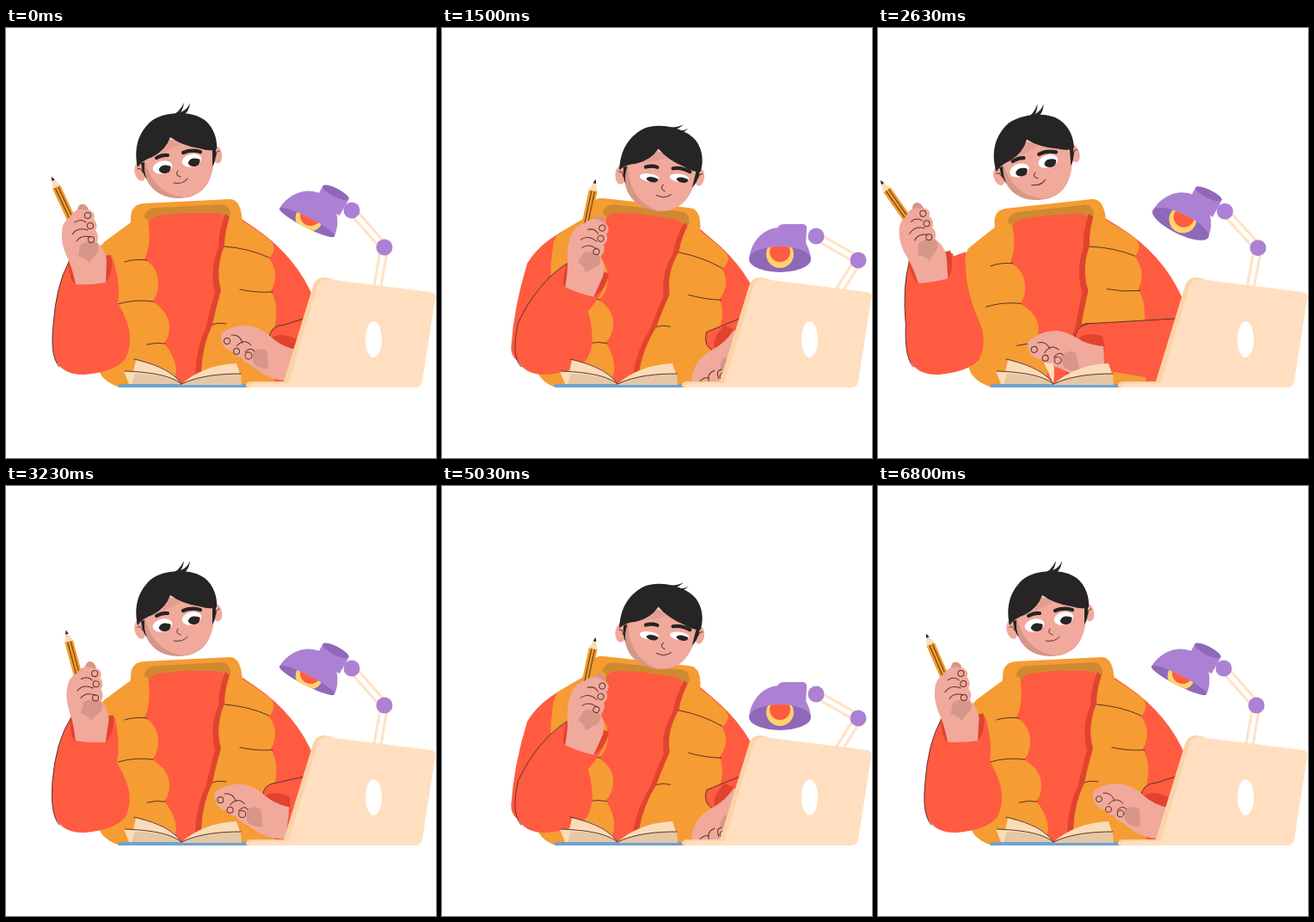
Recreate the animation shown at these times as an HTML page. Size 500x500 px, loop 6.83 s.

```html
<!DOCTYPE html>
<html lang="en">
<head>
<meta charset="utf-8">
<title>Studying at the desk</title>
<style>
html, body { margin: 0; width: 100%; height: 100%; overflow: hidden; background: #fff; }
svg { display: block; width: 100vw; height: 100vh; }
.red { fill: #ff5b41; }
.deep { fill: #e2432f; }
.vest { fill: #f59c33; }
.skin { fill: #f0a99b; }
.shade { fill: #d69688; }
.dark { fill: #262424; }
.purple { fill: #ac80d3; }
.plum { fill: #9068b8; }
.cream { fill: #ffdfc0; }
.line { fill: none; stroke: #5c3428; stroke-width: 1; stroke-linecap: round; stroke-linejoin: round; }
.rod { fill: none; stroke: #ffe2c4; stroke-width: 11; }
.gap { fill: none; stroke: #fff; stroke-width: 5; }
</style>
</head>
<body>
<svg viewBox="0 0 500 500">
  <clipPath id="desk"><rect width="500" height="418"/></clipPath>
  <clipPath id="opening"><ellipse id="mask" rx="36"/></clipPath>
  <g clip-path="url(#desk)">
    <g id="lamp">
      <path id="rod" class="rod"/><path id="gap" class="gap"/>
      <circle id="knob1" class="purple" r="9.5"/><circle id="knob2" class="purple" r="9.5"/>
      <g id="shade">
        <g id="neck">
          <path class="purple" d="M-3-20V-34Q-3-41 5-41H27Q32-40 31-34L30-16Z"/>
          <ellipse id="cap" class="plum" cx="14" cy="-38" rx="17"/>
        </g>
        <path class="purple" d="M-36 0C-34-22-18-37 0-37S34-22 36 0Z"/>
        <ellipse id="rim" class="plum" rx="36"/>
        <g clip-path="url(#opening)">
          <circle cy="-6" r="16" fill="#ffd36b"/><circle cy="-9" r="12" fill="#ff5b41"/>
        </g>
      </g>
    </g>

    <path data-rule="shoulder" class="red" d="M130 245Q80 262 66 290Q58 335 62 375Q66 400 120 390L140 300Z"/>
    <g id="clothes">
      <path data-rule="bend" class="red" d="M165 217L262 214L290 233Q338 266 358 315L375 418L140 418L116 330Q110 270 165 217Z"/>
      <path data-rule="bend" class="vest" d="M146 232Q141 205 160 204L260 199Q275 199 275 232L210 240Z"/>
      <path data-rule="bend" fill="#d08930" d="M160 226Q160 209 176 209L252 205Q262 206 262 226L210 230Z"/>
      <path data-rule="bend" class="red" d="M163 234Q166 220 178 218L205 215L246 215Q256 217 257 230L250 330L185 330Z"/>
      <use href="#right" class="deep" transform="translate(-7 2)"/>
      <path data-rule="bend" class="vest" d="M150 216L165 223Q170 250 161 269Q177 278 177 298Q177 310 170 318Q190 330 190 348Q190 360 184 366Q198 384 198 400L193 418L132 418Q104 408 106 385Q106 365 120 335Q108 300 109 270Q108 255 114 249Q130 237 148 224Z"/>
      <g class="vest"><path id="right" data-rule="bend" d="M262 214Q254 235 254 253Q243 280 250 305Q243 330 240 345Q228 370 227 400L228 418L312 418L312 350Q318 322 308 306Q319 286 306 268Q317 255 306 246Q292 235 274 224Z"/></g>
      <path data-rule="bend" class="line" d="M138 272Q150 268 164 270M130 321Q150 315 171 318M164 368Q175 365 185 367M254 254Q282 256 306 267M272 304Q290 308 310 307M240 345Q247 342 256 344"/>
    </g>

    <g id="head">
      <ellipse class="skin" cx="156" cy="167" rx="6.5" ry="11" transform="rotate(-12 156 167)"/>
      <ellipse class="skin" cx="245" cy="147" rx="6" ry="10.5" transform="rotate(-12 245 147)"/>
      <path class="line" d="M153 164q4-2 6 4M248 143q-4 0-4 6"/>
      <path class="shade" d="M157 140C157 180 172 198 202 198C232 197 244 175 242 135Z"/>
      <path class="skin" d="M158 130C160 172 178 193 206 197C233 195 245 172 242 130Z"/>
      <path class="dark" d="M157 157L161 156Q160 167 164 176Q158 169 157 157ZM240 140L244 140Q245 154 240 161Z"/>
      <path class="dark" d="M153 162C149 142 152 124 168 109C182 97 215 95 231 107C242 116 246 130 245 141Q238 144 225 140Q205 137 191 127Q186 142 170 150Q158 154 153 162Z"/>
      <path class="shade" d="M191 127Q197 133 203 135Q193 141 179 146Q188 139 191 127Z" opacity=".55"/>
      <path id="tuft" class="dark" d="M192 102Q201 99 207 87Q206 94 203 98Q211 95 214 87Q213 97 206 102Z"/>
      <g id="face">
        <g id="eyes"></g>
        <path fill="none" stroke="#262424" stroke-width="4.2" stroke-linecap="round" d="M175 151Q182 147 188 148M206 145Q215 141 226 144"/>
        <path class="line" d="M200 166Q196 171 203 173M195 180Q206 182 211 175"/>
      </g>
    </g>

    <path data-rule="sleeve" class="red" d="M73 272Q58 300 55 345Q52 372 57 385Q66 404 92 403Q125 400 138 386Q147 370 143 350Q138 332 130 320Q134 300 124 267Z"/>
    <path data-rule="sleeve" class="line" d="M73 272Q58 300 55 345Q52 372 57 385Q59 391 62 394"/>
    <g id="hand">
      <path class="deep" d="M72 271Q75 297 81 298L116 296Q126 283 122 264Z"/>
      <g id="pencil">
        <path fill="#ef9c2b" d="M-5-41H5V8H-5Z"/>
        <path class="line" d="M-1.700-40V8M2-40V8"/>
        <path fill="#fbdcb5" d="M-5-41L0-54L5-41Z"/>
        <path class="dark" d="M-1.800-49.500L0-54.500L1.800-49.500Z"/>
      </g>
      <path class="shade" d="M83 212Q84 203 91 205Q96 207 97 216L92 226Z"/>
      <path class="skin" d="M81 298Q77 278 70 264Q64 250 65 238Q65 226 74 220Q80 210 88 211L98 212Q105 216 102 222Q108 229 104 235Q109 241 106 249Q116 258 117 270L116 296Q98 299 81 298Z"/>
      <path class="shade" d="M86 252Q96 246 106 250Q111 259 103 265L97 273Q91 266 84 266Z"/>
      <path class="line" d="M80 226Q87 221 93 226M77 240Q83 231 95 235M82 248Q87 240 98 243"/>
      <g class="line"><circle cx="95" cy="218" r="3.500"/><circle cx="98" cy="230" r="3.500"/><circle cx="99" cy="246" r="3.500"/></g>
    </g>

    <path data-rule="forearm" class="red" d="M334 402L306 362Q306 346 324 345L346 338L380 340L380 412L346 412Z"/>
    <path data-rule="forearm" class="line" d="M306 362Q306 346 324 345L346 338"/>
    <path id="page" class="cream"/>
    <g id="typing">
      <path class="deep" d="M306 362Q318 352 338 362L338 380Z"/>
      <path class="skin" d="M251 365Q247 355 257 351Q270 344 287 347Q298 350 309 360Q320 370 337 374L332 411Q306 409 296 400Q286 393 280 389Q275 388 275 383Q266 383 264 377Q253 374 251 365Z"/>
      <path class="shade" d="M287 376Q297 370 304 376L305 396Q292 397 287 388Z"/>
      <path class="line" d="M262 357Q272 356 275 366M268 370Q277 360 285 369M278 377Q285 370 289 376"/>
      <g class="line"><circle cx="257" cy="364" r="3.500"/><circle cx="268" cy="376" r="3.500"/><circle cx="282" cy="381" r="4"/></g>
    </g>

    <g id="book">
      <path fill="#70a2cc" d="M131 414H279V418H131Z"/>
      <path fill="#fbdcb8" d="M151 386C174 390 194 398 204 414L148 400Z"/>
      <path fill="#fbdcb8" d="M137 399C160 400 188 402 204 414H143Z"/>
      <path fill="#e5c7a5" d="M150 402C170 402 190 405 204 414H146Z"/>
      <path fill="#fbdcb8" d="M204 414C220 400 242 391 268 390L272 402Z"/>
      <path fill="#e5c7a5" d="M204 414C225 404 250 402 273 402L274 415H204Z"/>
      <path class="line" d="M149 385C174 391 194 399 204 414M138 399C165 400 190 403 204 414C225 404 250 402 273 402"/>
    </g>

    <path fill="#fbd3a8" d="M279 416Q279 411 286 411H323L357 300Q360 290 370 290L380 292V418H281Z"/>
    <path class="cream" d="M327 418L362 301Q365 291 374 292L494 307Q501 308 499 315L484 411Q483 418 476 418ZM283 418Q282 413 290 413H328V418Z"/>
    <ellipse cx="427.500" cy="362" rx="9.500" ry="21" fill="#fff"/>
  </g>
</svg>
<script>
const CYCLE = 3415; // the gesture plays twice per 6830 ms loop

// Everything follows these few drivers, given as [time, value] key points
const drivers = {
  lean: [[0, 0], [830, .88], [1250, 1], [1615, 1], [2100, .24], [2615, -.3], [3200, 0]],
  dip: [[0, 0], [830, .8], [1250, 1], [1615, 1], [2100, .82], [2615, .06], [2930, -.2], [3200, 0]],
  elbow: [[0, 0], [830, .75], [1250, 1], [1615, 1], [2100, -.25], [2615, -.7], [3200, 0]],
  wrist: [[0, 0], [830, .45], [1400, 1], [1615, 1], [2100, 0], [2615, -.56], [3230, 0]],
  swing: [[0, 0], [150, -8], [830, 8], [1400, 37], [1615, 37], [2100, 16], [2615, -10], [3230, 10]],
  reach: [[0, 0], [830, -.95], [1250, -1], [1615, -1], [2100, 1], [2615, .98], [3230, .1], [3385, 0]]
};
const PAGE_FROM = 2450, PAGE_TO = 2950;

const $ = id => document.getElementById(id);
const set = (id, attrs) => { for (const k in attrs) $(id).setAttribute(k, attrs[k]); };
const clamp = v => Math.max(0, Math.min(1, v));
const mix = (a, b, k) => a.map((v, i) => v + (b[i] - v) * k);

// Periodic monotone cubic through the key points
function sample(keys, t) {
  const n = keys.length;
  const key = i => {
    const [time, value] = keys[(i + n) % n];
    return [time + Math.floor(i / n) * CYCLE, value];
  };
  let i = n - 1;
  while (keys[i][0] > t) i--;
  const [[t0, a], [t1, b], [t2, c], [t3, d]] = [i - 1, i, i + 1, i + 2].map(key);
  const h = t2 - t1, u = (t - t1) / h, s = (c - b) / h;
  const tangent = (p, q) => p * q > 0 ? 2 * p * q / (p + q) : 0;
  const m1 = tangent((b - a) / (t1 - t0), s) * h, m2 = tangent(s, (d - c) / (t3 - t2)) * h;
  return b + u * (m1 + u * (3 * (c - b) - 2 * m1 - m2 + u * (2 * (b - c) + m1 + m2)));
}

// A rigid move: turn about a pivot, then shift
function rigid(px, py, dx, dy, turn) {
  const r = turn * Math.PI / 180, cos = Math.cos(r), sin = Math.sin(r);
  return {
    css: `translate(${dx} ${dy}) rotate(${turn} ${px} ${py})`,
    point: ([x, y]) => [px + dx + (x - px) * cos - (y - py) * sin, py + dy + (x - px) * sin + (y - py) * cos]
  };
}

const soft = [...document.querySelectorAll('[data-rule]')]
  .map(el => ({ el, rule: el.dataset.rule, d: el.getAttribute('d') }));
const warp = (d, move) => d.replace(/(-?[\d.]+) (-?[\d.]+)/g, (_, x, y) => move([+x, +y]).join(' '));

for (const [x, y] of [[182, 162], [216, 154]]) {
  $('eyes').insertAdjacentHTML('beforeend', `<g class="eye" data-at="${x} ${y}">
    <ellipse rx="11.500" ry="7.500" fill="#fff" transform="rotate(-13)"/>
    <path class="pupil dark" d="M-7.500 0Q-5-5 0-4.500T7-2Q6 5 0 5T-7.500 0Z"/></g>`);
}
const eyes = [...document.querySelectorAll('.eye')];

function drawBody({ lean, dip, elbow, wrist, swing, reach }) {
  const turn = .6 * swing;
  const hand = rigid(98, 295, 62 * wrist, 10 * lean, turn);
  const r = Math.abs(reach);
  const typing = reach < 0 ? rigid(280, 372, 38 * r, 32 * r, -70 * r) : rigid(280, 372, -76 * r, 6 * r, -10 * r);

  const rules = {
    bend([x, y]) {
      const k = Math.max(0, (415 - y) / 210);
      const tilt = .19 * lean - .03 * dip;
      return [x + k * (34 * lean - 6 * dip), y + k * (10 * dip - 8 * lean + tilt * (x - 210))];
    },
    shoulder([x, y]) {
      const k = clamp((400 - y) / 150);
      return [x + elbow * (14 + 26 * k), y - 22 * elbow * k];
    },
    sleeve: p => mix([p[0] + 30 * elbow, p[1]], hand.point(p), clamp((365 - p[1]) / 95)),
    forearm: p => mix(p, typing.point(p), clamp((345 - p[0]) / 10))
  };
  for (const { el, rule, d } of soft) el.setAttribute('d', warp(d, rules[rule]));
  set('hand', { transform: hand.css });
  set('pencil', { transform: `translate(76 222) rotate(${swing - turn - 25})` });
  set('typing', { transform: typing.css });
}

function drawHead({ lean, dip, wrist }) {
  set('head', { transform: rigid(201, 157, 53 * lean, 19 * dip - 4 * lean, 14 * lean).css });
  set('tuft', { transform: `rotate(${18 * dip + 8 * lean} 198 102)` });
  set('face', { transform: `translate(${7 * lean} 0)` });
  const lid = 1 - .38 * Math.max(0, wrist) ** 3;
  for (const eye of eyes) {
    eye.setAttribute('transform', `translate(${eye.dataset.at}) scale(1 ${lid})`);
    eye.querySelector('.pupil').setAttribute('transform', `translate(${3 + lean} 2) rotate(-8)`);
  }
}

function drawLamp({ lean, dip }) {
  const ry = 6 + 9 * dip + 18 * Math.max(0, -lean);
  set('shade', { transform: `translate(${350 + 43 * dip} ${226 + 43 * dip}) rotate(${27 * (1 - dip)})` });
  set('neck', { transform: `translate(0 ${-8 * (1 - dip)})` });
  set('cap', { ry: 5 * clamp(1 - dip) });
  set('rim', { ry });
  set('mask', { ry });
  const a = [402 + 33 * dip, 212 + 30 * dip], b = [440 + 44 * dip, 255 + 15 * dip];
  const d = `M${a}L${b}L419 374`;
  set('rod', { d });
  set('gap', { d });
  set('knob1', { cx: a[0], cy: a[1] });
  set('knob2', { cx: b[0], cy: b[1] });
}

function drawPage(t) {
  const u = (t - PAGE_FROM) / (PAGE_TO - PAGE_FROM);
  const x = 152 + 116 * u, y = 390 - 24 * Math.sin(Math.PI * u);
  set('page', { d: u > 0 && u < 1 ? `M204 414Q${x + 14} ${y + 10} ${x} ${y}L${x - 4} ${y + 14}Z` : '' });
}

const start = performance.now();
function frame() {
  const t = (performance.now() - start) % CYCLE;
  const pose = {};
  for (const name in drivers) pose[name] = sample(drivers[name], t);
  drawBody(pose);
  drawHead(pose);
  drawLamp(pose);
  drawPage(t);
  requestAnimationFrame(frame);
}
frame();
</script>
</body>
</html>
```
